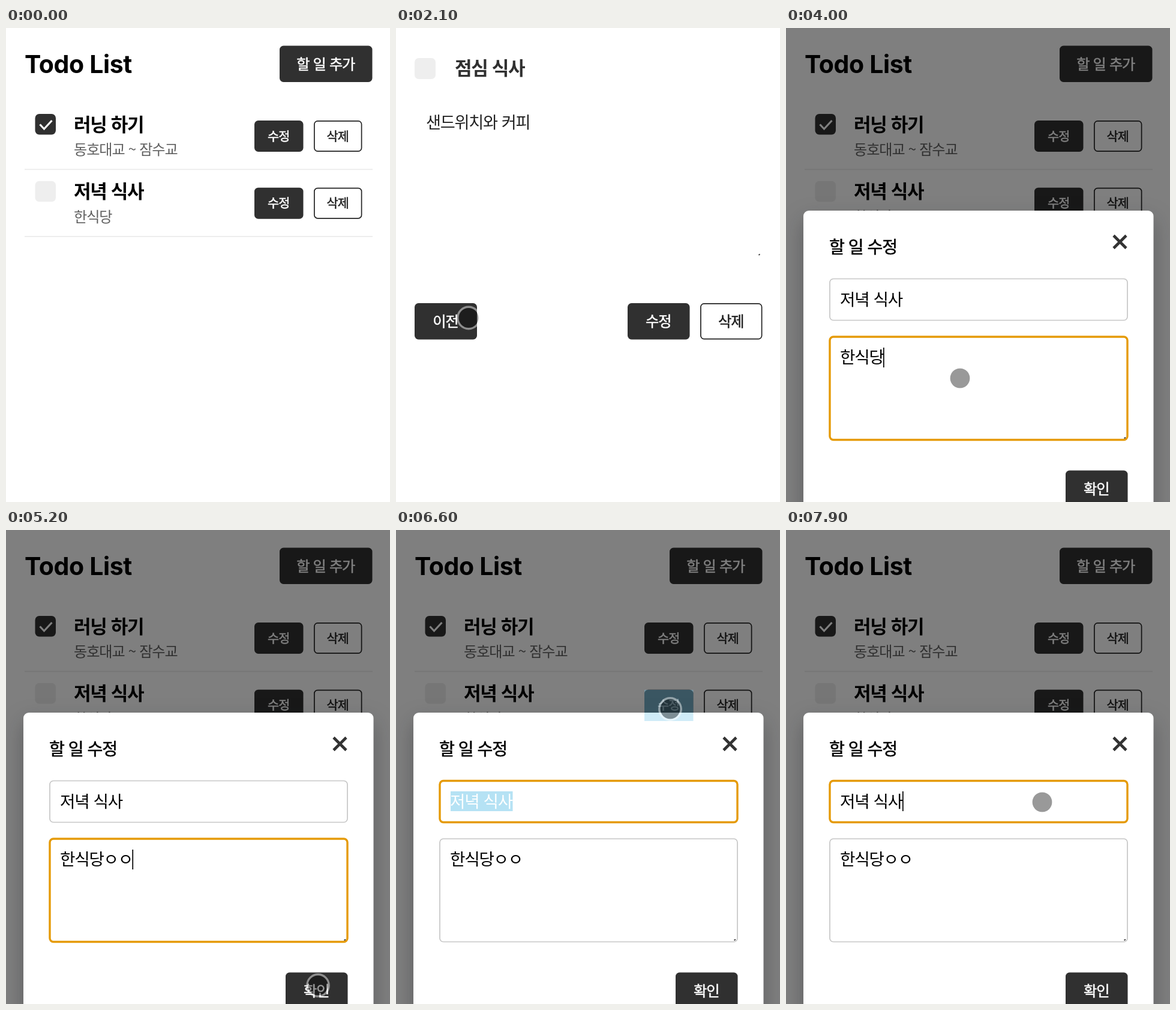
An HTML page for the animation above (8 s loop, 640x789 px).

```html
<!DOCTYPE html>
<html lang="ko">
<head>
<meta charset="utf-8">
<title>Todo List</title>
<style>
  html, body { margin: 0; width: 100%; height: 100%; overflow: hidden; background: #fff; }
  svg { display: block; width: 640px; height: 789px; }
  text {
    font-family: 'Noto Sans CJK KR', 'Noto Sans KR', 'Noto Sans CJK', 'Noto Sans CJK JP', sans-serif;
    letter-spacing: -.046em; word-spacing: .02em; white-space: pre;
  }
  .head { font: 700 41px Inter, sans-serif; letter-spacing: -.009em; word-spacing: 0; }
  .bold { font-weight: 700; word-spacing: .005em; }
  .medium { stroke-width: .55px; }
  #menu text { letter-spacing: -.03em; word-spacing: .05em; }
  #sheet { transform-origin: 320.5px 573px; }
  #panel { filter: drop-shadow(0 16px 18px rgba(14,18,22,.3)); }
  #menuBox { filter: drop-shadow(0 6px 12px rgba(0,0,0,.3)); }
</style>
</head>
<body>
<svg id="stage" viewBox="0 0 640 789"></svg>
<script>
const DARK = '#303030', GREY = '#c6c6c6', FOCUS = '#e59a06';

// --- markup helpers ---
const attrs = o => Object.entries(o).map(([k, v]) => `${k}="${v}"`).join(' ');
const rect = (x, y, width, height, rx, fill, more = {}) =>
  `<rect ${attrs({ x, y, width, height, rx, fill, ...more })}/>`;
const text = (x, y, size, str, fill = '#000', more = {}) =>
  `<text ${attrs({ x, y, 'font-size': size, fill, ...more })}>${str}</text>`;
const medium = (fill, more = {}) => ({ class: 'medium', stroke: fill, ...more });
const line = (d, stroke, w, more = {}) =>
  `<path ${attrs({ d, stroke, 'stroke-width': w, fill: 'none', ...more })}/>`;
const group = (id, ...parts) => `<g id="${id}">${parts.join('')}</g>`;

function button(x, y, w, h, size, label, outline) {
  const box = outline
    ? rect(x + .9, y + .9, w - 1.8, h - 1.8, 5.5, '#fff', { stroke: '#222', 'stroke-width': 1.7 })
    : rect(x, y, w, h, 6.5, DARK);
  const ink = outline ? '#222' : '#fff';
  return box + text(x + w / 2 - .5, y + h / 2 + size * .37, size, label, ink,
    medium(ink, { 'text-anchor': 'middle' }));
}

function row(dy, title, sub, done) {
  return `<g transform="translate(0 ${dy})">` +
    rect(48.5, 143, 34.5, 34.5, 7, done ? DARK : '#eee') +
    (done ? line('M56.5 160.5L63.5 168L76.5 154', '#fff', 3.2) : '') +
    text(113, 171.5, 31.1, title, '#000', { class: 'bold' }) +
    text(113, 211, 24.2, sub, '#606060', dy ? { id: 'sub' } : {}) +
    button(414, 154, 81.5, 52, 20.8, '수정') +
    button(513, 154, 80.5, 52, 20.8, '삭제', true) +
    line('M31 235.4H611', '#ebebeb', 1.7) + '</g>';
}

const field = (id, y, h) =>
  rect(73, y, 496, h, 6, '#fff', { id, stroke: GREY, 'stroke-width': 1.7 });

const menuItems = [
  [469, "'저녁 식사' 찾기", '#fff'], [526, '그림 이모티콘 &amp; 기호', '#1c1c1c'],
  [583, '실행 취소', '#adadad'], [621, '다시 실행', '#adadad'],
  [679, '잘라내기', '#1c1c1c'], [717, '복사', '#1c1c1c'],
  [755, '붙여넣기', '#1c1c1c'], [792, '붙여넣고 스타일 일치시킴', '#1c1c1c']
];

document.getElementById('stage').innerHTML =
  group('list',
    text(31, 74.5, 41, 'Todo List', '#000', { class: 'head' }),
    button(456, 29.5, 154.5, 60.5, 24.2, '할 일 추가'),
    row(0, '러닝 하기', '동호대교 ~ 잠수교', true),
    row(111.7, '저녁 식사', '한식당', false)) +
  group('detail',
    rect(31, 50, 35, 35, 7, '#eee'),
    text(98, 78, 31.1, '점심 식사', DARK, { class: 'bold' }),
    text(50, 167, 27.2, '샌드위치와 커피', '#222'),
    line('M604.5 378L606.5 376.5', '#333', 1.7),
    button(31, 458, 104, 60.5, 24.2, '이전'),
    button(386, 458, 103.5, 60.5, 24.2, '수정'),
    button(507, 458, 103.5, 60.5, 24.2, '삭제', true)) +
  rect(0, 0, 640, 789, 0, '#000', { id: 'shade' }) +
  group('sheet',
    rect(29, 304, 583.5, 538, 9, '#fff', { id: 'panel' }),
    text(72, 374.5, 28.2, '할 일 수정', '#000', medium('#000')),
    line('M546 345.5L567 366.5M567 345.5L546 366.5', '#333', 4.6),
    field('input', 417.5, 69),
    rect(91, 435, 103.5, 33, 0, '#b5e2f4', { id: 'marked' }),
    text(90, 461.5, 27.7, '저녁 식사', '#000', { id: 'name' }),
    field('area', 514, 171.5),
    text(90, 558, 27.7, '한식당', '#000', { id: 'note' }),
    line('M563.5 683L566 681.5', '#333', 1.7),
    button(466, 736.5, 103.5, 60.5, 24.2, '확인'),
    rect(0, 0, 1.7, 33, 0, '#000', { id: 'caret' })) +
  rect(414, 266, 81.5, 52, 0, 'rgba(120,200,235,.35)', { id: 'tap' }) +
  group('menu',
    rect(93.5, 441, 415, 420, 11, '#e3e3e3', { id: 'menuBox', stroke: '#b4b4b4', 'stroke-width': 1 }),
    rect(102, 450, 398, 38.5, 7, '#5b9efd'),
    line('M118 497.5H484M118 554.5H484M118 649.5H484', '#c6c6c6', 1.7),
    ...menuItems.map(([y, s, c]) => text(117, y + 8.3, 22, s, c))) +
  group('dot',
    '<circle r="16.5" fill="rgba(0,0,0,.4)"/>',
    '<circle r="18.2" fill="none" stroke="rgba(255,255,255,.45)" stroke-width="3.4"/>') +
  group('arrow',
    '<path d="M0 0V25L5.7 19.6L10.2 29.8L14.4 28L10 18H17.8Z" fill="#000" stroke="#fff" stroke-width="1.8"/>');

// --- timeline: pointer stops as [ms, x, y] ---
const path = [
  [600, 532, 523], [700, 430, 440], [800, 310, 355], [900, 260, 328], [1200, 260, 328],
  [1400, 253, 306], [1600, 253, 306], [1800, 236, 380], [1900, 236, 380], [2100, 121, 482.5],
  [2500, 121, 482.5], [2600, 190, 444], [2800, 465, 289], [3200, 465, 289], [3400, 436, 408],
  [3600, 350, 530], [3800, 290, 583], [4600, 290, 583], [4900, 495, 742], [5000, 520, 758],
  [5500, 520, 758], [5800, 485, 420], [6000, 458, 302], [6100, 457, 298], [6700, 457, 298],
  [6900, 420, 420], [7100, 395, 472], [7600, 395, 472], [7800, 427, 453], [8000, 427, 453]
];

const el = id => document.getElementById(id);
const within = (t, a, b) => t >= a && t < b;
const clamp = v => Math.min(1, Math.max(0, v));
const show = (id, on) => el(id).setAttribute('visibility', on ? 'visible' : 'hidden');
const set = (id, o) => Object.entries(o).forEach(([k, v]) => el(id).setAttribute(k, v));

function pointer(t) {
  const i = path.findIndex(p => p[0] > t);
  if (i < 1) return path[0].slice(1);
  const [t0, x0, y0] = path[i - 1], [t1, x1, y1] = path[i];
  const k = (t - t0) / (t1 - t0);
  return [x0 + (x1 - x0) * k, y0 + (y1 - y0) * k];
}

function opened(t) {
  const start = t >= 6150 ? 6150 : 2950;
  if (t < start || within(t, 5400, 6150)) return 0;
  return 1 - (1 - clamp((t - start) / 150)) ** 3;
}

function render(t) {
  const onDetail = within(t, 1400, 2300);
  show('detail', onDetail);
  show('list', !onDetail);
  el('sub').textContent = t >= 5400 ? '한식당ㅇㅇ' : '한식당';

  const p = opened(t);
  set('shade', { opacity: p * .5 });
  el('sheet').style.opacity = p;
  el('sheet').style.transform = `translateY(${(1 - p) * 11}px) scale(${.96 + p * .04})`;

  const inArea = within(t, 4000, 5400);
  const picked = !inArea && t < 7800;
  const typed = t >= 4500 ? 2 : t >= 4300 ? 1 : 0;
  for (const [id, on] of [['input', !inArea], ['area', inArea]])
    set(id, { stroke: on ? FOCUS : GREY, 'stroke-width': on ? 3.4 : 1.7 });
  show('marked', picked);
  set('name', { fill: picked ? '#fff' : '#000' });
  el('note').textContent = '한식당' + 'ㅇ'.repeat(typed);
  show('caret', p > 0 && !picked && !within(t, 4700, 5200));
  set('caret', inArea ? { x: 162 + typed * 24.2, y: 532 } : { x: 194, y: 435 });

  show('tap', within(t, 2900, 4000) || within(t, 6200, 7100));

  const menuOn = within(t, 7200, 7800);
  show('menu', menuOn);
  set('menu', { opacity: t >= 7700 ? .45 : 1 });
  const at = `translate(${pointer(t)})`;
  set('dot', { transform: at });
  set('arrow', { transform: at });
  show('dot', t >= 600 && !menuOn);
  show('arrow', menuOn);
}

const began = performance.now();
function tick() {
  const t = (performance.now() - began) % 8000;
  render(Math.floor(t / 100) * 100);
  requestAnimationFrame(tick);
}
tick();
</script>
</body>
</html>
```
